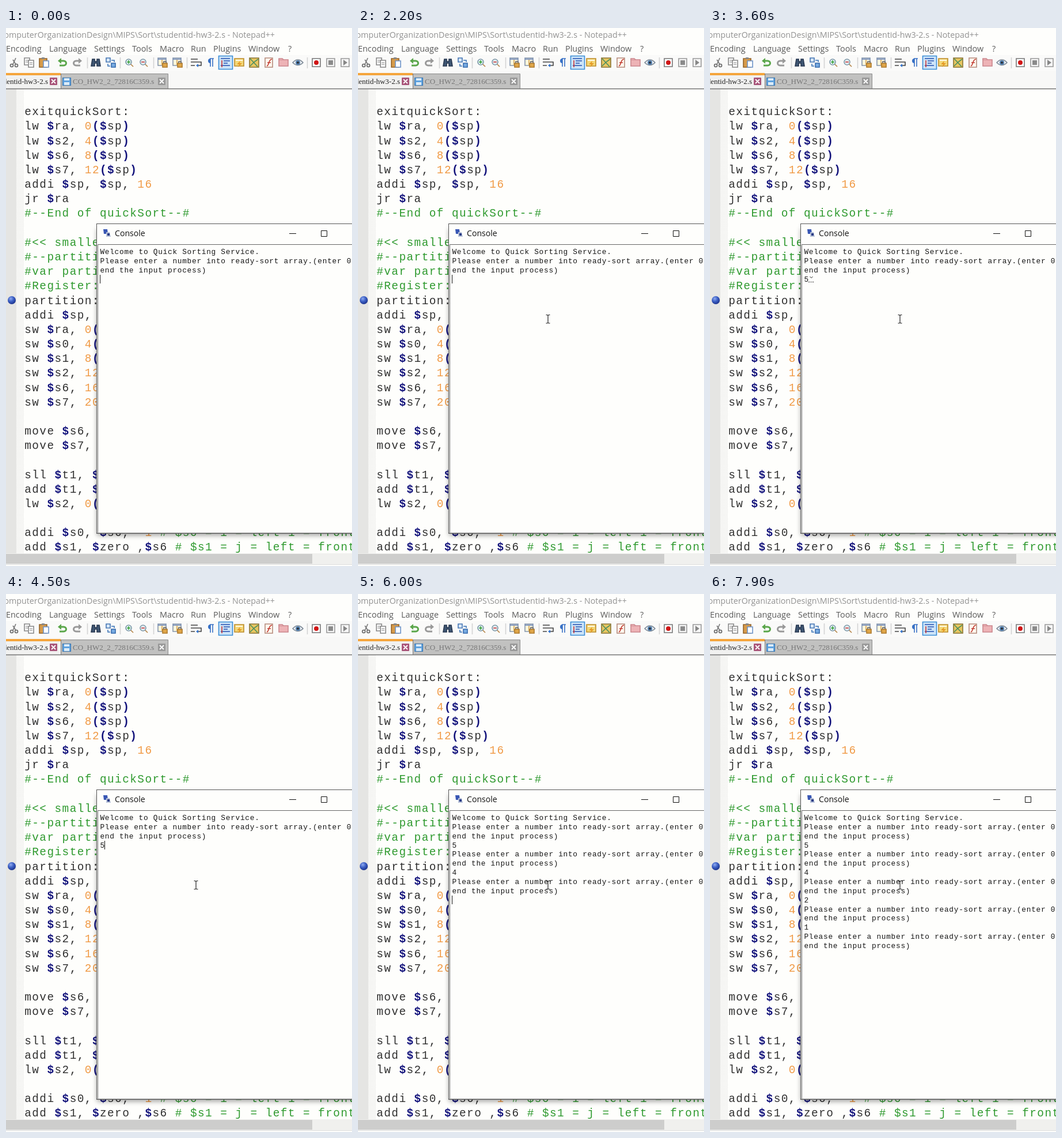
These frames come from a looping animation (601 px wide and 933 px high, 8 s). An HTML page:

```html
<!DOCTYPE html>
<html lang="en">
<head>
<meta charset="utf-8">
<title>Console input over an editor</title>
<style>
  html, body { margin: 0; width: 100%; height: 100%; overflow: hidden; background: #fefefc; }
  svg { display: block; width: 601px; height: 933px; }
  text { white-space: pre; }
  .ui { font-family: "Open Sans", "Noto Sans", sans-serif; }
  .tab { font: 13px "Liberation Serif", serif; }
  .code { font: 19.4px "Liberation Mono", monospace; letter-spacing: 1.44px; fill: #303030; }
  .op { font-weight: bold; fill: #14147c; }
  .num { fill: #f09a45; }
  .rem { fill: #2f9a2f; }
  #log { font: 12.8px "Liberation Mono", monospace; letter-spacing: .72px; fill: #161616; }
</style>
</head>
<body>
<svg viewBox="0 0 601 933">
  <defs>
    <filter id="blur" x="-10%" y="-10%" width="120%" height="120%"><feGaussianBlur stdDeviation="4"/></filter>
    <pattern id="check" width="2" height="2" patternUnits="userSpaceOnUse">
      <rect width="2" height="2" fill="#fbfbf9"/><path d="M0 0h1v1h-1zM1 1h1v1h-1z" fill="#f0f0ee"/>
    </pattern>
    <radialGradient id="ball" cx=".38" cy=".32" r=".7">
      <stop offset="0" stop-color="#8fabf0"/><stop offset=".5" stop-color="#3c5fc4"/><stop offset="1" stop-color="#1c338c"/>
    </radialGradient>
    <clipPath id="page"><rect x="160" y="376" width="441" height="500"/></clipPath>
  </defs>
  <rect width="601" height="933" fill="#fefefc"/>

  <!-- title, menu and toolbar -->
  <text class="ui" x="467" y="17" font-size="14.25" fill="#929292" text-anchor="end">ComputerOrganizationDesign\MIPS\Sort\studentid-hw3-2.s - Notepad++</text>
  <g id="menu" class="ui" font-size="14.4" fill="#5a5a5a"></g>
  <rect y="47" width="601" height="28" fill="#fafaf9"/>
  <g id="tools" fill="none" stroke-width="1.6"></g>

  <!-- tabs -->
  <rect y="75" width="601" height="31" fill="#f8f8f7"/>
  <rect y="79" width="95" height="26" fill="#f1f1f0"/>
  <rect y="78" width="95" height="4" fill="#f5a53c"/>
  <path d="M95.500 79V105" stroke="#777"/>
  <text class="tab" x="73" y="97" fill="#222" text-anchor="end">studentid-hw3-2.s</text>
  <rect x="96" y="80" width="185" height="25" fill="#c1c1c0"/>
  <path d="M96 79.500H281.500V105" fill="none" stroke="#8b8b8b"/>
  <rect x="98.500" y="86.500" width="14" height="13" fill="#5fa2df" stroke="#3572ad"/>
  <path d="M101 87h9v4h-9zM101 94h9v5h-9z" fill="#dcecf8"/>
  <text class="tab" x="116" y="97" fill="#777">CO_HW2_2_72816C359.s</text>
  <rect x="76" y="86" width="13" height="13" rx="1" fill="#a9557a"/>
  <rect x="264" y="86" width="13" height="13" rx="1" fill="#999"/>
  <path d="M79 89l7 7m0-7l-7 7M267 89l7 7m0-7l-7 7" stroke="#fff" stroke-width="1.8"/>

  <!-- editor -->
  <rect y="106" width="18" height="805" fill="#e5e5e3"/>
  <rect x="18" y="106" width="13" height="805" fill="url(#check)"/>
  <path d="M0 105.500H601" stroke="#747474" stroke-width="1.5"/>
  <g id="code" class="code"></g>
  <circle cx="10" cy="472" r="7" fill="url(#ball)"/>
  <rect y="911" width="601" height="19" fill="#f0f0ee"/>
  <rect y="912" width="532" height="17" fill="#cdcdcc"/>
  <path d="M0 930.500H601" stroke="#dedede"/>

  <!-- console window -->
  <rect x="158" y="348" width="470" height="532" fill="#000" opacity=".36" filter="url(#blur)"/>
  <rect x="157.500" y="339.500" width="470" height="537" fill="#fefefc" stroke="#555"/>
  <path d="M159.500 876V375.500H601" fill="none" stroke="#666"/>
  <path d="M158 875.500H601" stroke="#aaa"/>
  <path d="M169 349h7l1 8h-7z" fill="#3856b4"/>
  <path d="M174 354h6l2 8h-8z" fill="#b5bfd6"/>
  <path d="M176 356h4v4h-4z" fill="#2b3d86"/>
  <text class="ui" x="189" y="361" font-size="14.1" fill="#111">Console</text>
  <path d="M492 356.500H504M547.500 351.500H557.500V361.500H547.500Z" fill="none" stroke="#111"/>
  <g clip-path="url(#page)">
    <g id="log"></g>
    <path id="caret" d="M.5 0V15" stroke="#111"/>
    <g id="compose" fill="none" stroke="#222">
      <path d="M173.500 431l2.500 2.500 2.500-2.500"/>
      <path d="M171 440.500H180" stroke-dasharray="2 1.500"/>
    </g>
  </g>

  <!-- pointer -->
  <g id="pointer">
    <path id="arrow" d="M.5 0V15.500L4.200 12 6.800 17.500 9.300 16.300 6.700 11H11Z" fill="#fff" stroke="#222"/>
    <path id="beam" d="M-3.500-7.500H-1.500L0-6.500 1.500-7.500H3.500M0-6.500V6M-3.500 7H-1.500L0 6 1.500 7H3.500" fill="none" stroke="#222" stroke-width="1.200"/>
  </g>
</svg>

<script>
const el = id => document.getElementById(id);
const esc = s => s.replace(/&/g, '&amp;').replace(/</g, '&lt;');
const path = (d, stroke, fill = 'none') => `<path d="${d}" stroke="${stroke}" fill="${fill}"/>`;
const box = (x, y, w, h, fill, stroke = 'none') => path(`M${x} ${y}h${w}v${h}h${-w}z`, stroke, fill);

// Menu
el('menu').innerHTML = Object.entries({
  Encoding: 0, Language: 75, Settings: 153, Tools: 219, Macro: 267, Run: 321, Plugins: 360, Window: 421, '?': 490
}).map(([name, x]) => `<text x="${x}" y="41">${name}</text>`).join('');

// Toolbar icons, each drawn around its own centre
const lens = sign => path('M2 2l5 5', '#b48245') +
  '<circle cx="-1" cy="-1" r="5" stroke="#7d98a8" fill="#e2f0f4"/>' + sign;
const panes = box(-8, -8, 14, 13, '#fff6dc', '#8596ad') + path('M-8-6H6', '#6685bd') +
  path('M-1-5V5', '#d1a553') + box(0, 1, 8, 7, '#dfa648', '#ae7a2c') + path('M2 1V-2H6V1', '#666');
const page = (x, y) => box(x, y, 9, 12, '#fff', '#888') + path(`M${x + 2} ${y + 4}h5m-5 3h5`, '#aaa');
const turn = colour => `<g stroke-width="3">${path('M-5 5H2C8 5 8-3 2-3H-3', colour)}</g>` +
  path('M-8-3l6-5v10z', 'none', colour);
const icons = [
  [14, path('M3-8L-2 3M-2-5L3 3', '#777') + '<circle cx="-4" cy="5" r="2.500" stroke="#666"/><circle cx="4" cy="5" r="2.500" stroke="#666"/>'],
  [40, page(-8, -8) + page(-1, -4)],
  [66, box(-8, -7, 13, 15, '#d79b4a', '#936328') + box(-4, -9, 5, 3, '#888') + box(-1, -3, 9, 11, '#fff', '#6d93c8')],
  [98, turn('#5aa64a')],
  [124, `<g transform="scale(-1 1)">${turn('#999')}</g>`],
  [156, path('M-6-6h4v4h4v-4h4l2 12h-6v-5h-4v5h-6z', '#283850', '#3f5774')],
  [182, box(-8, -8, 7, 7, '#d9e8f7', '#4475b4') + box(1, 1, 7, 7, '#78abe1', '#356aad') + path('M1-4H6V-1M-5 2V6H-1', '#3a73b6')],
  [214, lens(path('M-4-1h6M-1-4v6', '#38a038'))],
  [239, lens(path('M-4-1h6', '#cf3e3e'))],
  [272, panes],
  [298, panes],
  [331, path('M-10-6H2M-10-1H8V5H2M-10 5H-3', '#444') + path('M3 2v6l-4-3z', 'none', '#3375cf')],
  [355, path('M0-7V7M4-7V7M6-7H-1', '#3770c5') + path('M0-7a4 4 0 0 0 0 8z', 'none', '#3770c5')],
  [381, box(-11.5, -11.5, 24, 23, '#cde4f8', '#3b8ed6') + path('M-8-7H8M-3-3H8M-3 1H4M-8 5H8', '#244fae') + path('M-6-4V8', '#c33')],
  [405, box(-8, -7, 16, 13, '#f4d877', '#bc8c2c') + path('M-6-4H6', '#fff') + path('M2-3l-6 6h4l-2 5 7-7H1z', 'none', '#e59925')],
  [431, box(-8, -8, 16, 16, '#e7c661', '#8a7434') + path('M-7-7l13 14M7-6l-7 5-7 7', '#4d8f60')],
  [457, box(-7, -8, 13, 16, '#fff8ef', '#b68b7c') + path('M-4 6C1 4-2-5 5-6M-3 0h6', '#c33c33')],
  [482, box(-8, -5, 16, 11, '#edb3b6', '#cb878d') + path('M-8-5v-2h6l2 2', '#cb878d', '#edb3b6')],
  [507, path('M-9 0Q0-10 9 0Q0 9-9 0z', '#7f8b98', '#eef2f5') + '<circle r="4" fill="#537fae"/><circle r="1.800" fill="#222"/>'],
  [539, box(-7, -7, 14, 14, '#fff', '#777') + '<circle r="4" fill="#d01717"/>'],
  [564, box(-7, -7, 14, 14, '#f6f6f6', '#999') + box(-4, -4, 8, 8, '#8b8b8b')],
  [589, box(-7, -7, 14, 14, '#f6f6f6', '#999') + path('M-3-5l7 5-7 5z', 'none', '#888')]
];
el('tools').innerHTML = icons.map(([x, art]) => `<g transform="translate(${x} 60)">${art}</g>`).join('') +
  [141, 198, 256, 314, 523].map(x => path(`M${x}.5 51V70`, '#d3d3d3')).join('');

// Source listing with simple highlighting
const source = `exitquickSort:
lw $ra, 0($sp)
lw $s2, 4($sp)
lw $s6, 8($sp)
lw $s7, 12($sp)
addi $sp, $sp, 16
jr $ra
#--End of quickSort--#

#<< smaller
#--partition
#var partition
#Register:
partition:
addi $sp,
sw $ra, 0($sp)
sw $s0, 4($sp)
sw $s1, 8($sp)
sw $s2, 12($sp)
sw $s6, 16($sp)
sw $s7, 20($sp)

move $s6,
move $s7,

sll $t1, $s7
add $t1, $s6
lw $s2, 0($t1)

addi $s0, $s6, -1 # $s0 = i = left-1 = front
add $s1, $zero ,$s6 # $s1 = j = left = front`;

const paint = line => line.replace(/(#.*)|([$()-])|\b(\d+)\b/g, (m, rem, op) =>
  `<tspan class="${rem ? 'rem' : op ? 'op' : 'num'}">${esc(m)}</tspan>`);
el('code').innerHTML = source.split('\n').map((line, i) =>
  `<text x="32.200" y="${151.3 + i * 25.17}">${paint(line)}</text>`).join('');

// Console session
const prompt = 'Please enter a number into ready-sort array.(enter 0\nend the input process)\n';
const intro = 'Welcome to Quick Sorting Service.\n' + prompt;
const keys = [[3100, '5'], [4900, '\n'], [5600, '4'], [5900, '\n'], [6400, '2'], [6900, '\n'], [7100, '1'], [7300, '\n']];
const composing = [3400, 4200];
const CELL = 8.4, PITCH = 15.86;

// Pointer route: time, x, y
const route = [[1000, 606, 335], [1300, 383, 367], [1800, 330, 505]];

function pointerAt(t) {
  const last = route[route.length - 1];
  if (t >= last[0]) return last.slice(1);
  const i = route.findIndex(p => p[0] > t);
  const [a, b] = [route[i - 1], route[i]];
  const k = (t - a[0]) / (b[0] - a[0]), ease = k * (2 - k);
  return [1, 2].map(n => a[n] + (b[n] - a[n]) * ease);
}

const show = (id, on) => el(id).setAttribute('visibility', on ? 'visible' : 'hidden');
const move = (id, x, y) => el(id).setAttribute('transform', `translate(${x} ${y})`);
let shown = '';

function draw(t) {
  let text = intro, touched = 0;
  for (const [at, key] of keys) {
    if (at > t) break;
    text += key === '\n' ? key + prompt : key;
    touched = at;
  }
  const lines = text.split('\n'), row = lines.length - 1;
  if (text !== shown) {
    el('log').innerHTML = lines.map((s, i) =>
      `<text x="163.400" y="${392 + i * PITCH}">${s}</text>`).join('');
    shown = text;
  }
  const busy = t >= composing[0] && t < composing[1];
  show('compose', busy);
  show('caret', !busy && (t - touched) % 1000 < 500);
  move('caret', 163 + Math.round(lines[row].length * CELL), Math.round(380 + row * PITCH));

  const here = t >= route[0][0];
  const [x, y] = here ? pointerAt(t) : [0, 0];
  move('pointer', x, y);
  show('arrow', here && y < 376);
  show('beam', here && y >= 376);
}

const start = performance.now();
function tick(now) {
  const t = Math.max(0, now - start) % 8000;
  draw(Math.floor(t / 100) * 100);
  requestAnimationFrame(tick);
}
draw(0);
requestAnimationFrame(tick);
</script>
</body>
</html>
```
